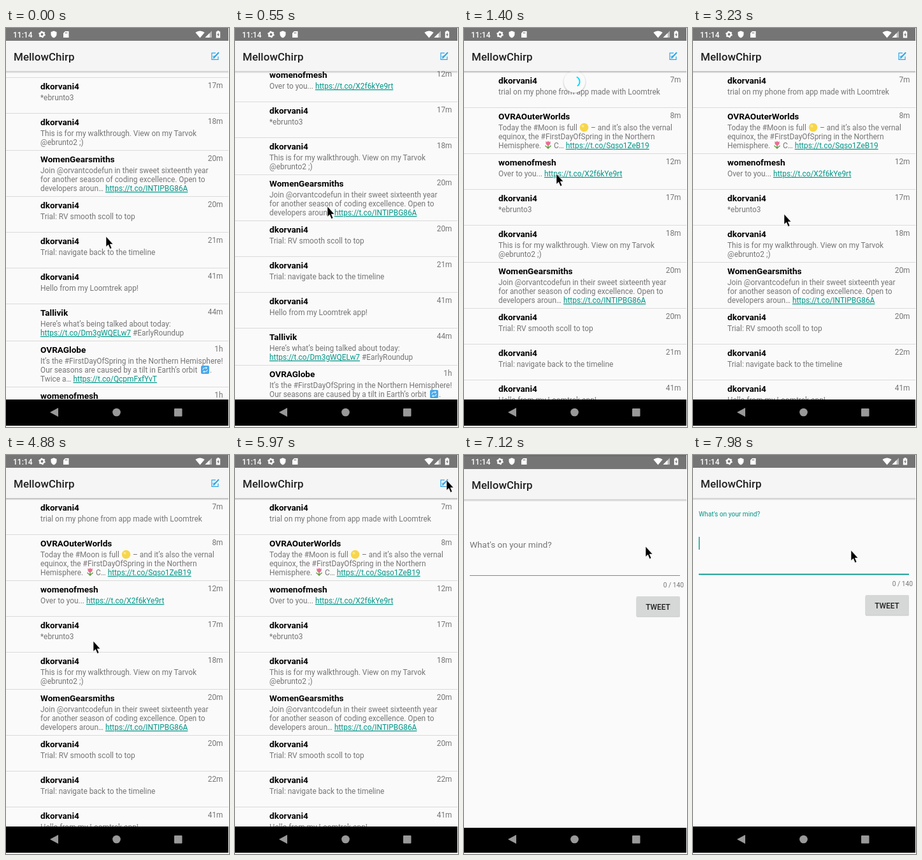
An HTML page for the animation above (8 s loop, 350 by 624 pixels).

```html
<!DOCTYPE html>
<html lang="en">
<head>
<meta charset="utf-8">
<title>Timeline</title>
<style>
  html, body { margin: 0; width: 100%; height: 100%; overflow: hidden; background: #fff; }
  svg { display: block; width: 350px; height: 624px; }
  text { font: 11.9px Roboto, sans-serif; fill: #757575; white-space: pre; }
  .name { font-size: 13.6px; font-weight: 700; fill: #000; }
  .title { font-size: 17px; font-weight: 500; fill: #212121; }
  .clock { font-size: 12px; font-weight: 500; fill: #fff; }
  .button { font-weight: 500; fill: #212121; text-anchor: middle; }
  .hint { font-size: 13.6px; fill: inherit; }
  .count { font-size: 10.2px; }
  .end { text-anchor: end; }
  .link { fill: #009688; text-decoration: underline; }
  .disc { filter: drop-shadow(0 1px 1.2px rgba(0,0,0,.28)); }
</style>
</head>
<body>
<svg viewBox="0 0 350 624">
  <defs>
    <clipPath id="listClip"><rect y="67" width="349" height="514"/></clipPath>
    <clipPath id="revealClip"><rect id="reveal" width="349" height="624"/></clipPath>
    <linearGradient id="shade" x2="0" y2="1">
      <stop stop-color="#000" stop-opacity=".26"/>
      <stop offset="1" stop-color="#000" stop-opacity="0"/>
    </linearGradient>
    <g id="bar">
      <rect width="349" height="20" fill="#757575"/>
      <rect y="67" width="349" height="4" fill="url(#shade)"/>
      <rect y="20" width="349" height="47.5" fill="#f5f5f5"/>
      <text class="title" x="12" y="50.5">MellowChirp</text>
    </g>
  </defs>

  <rect y="581" width="349" height="41" fill="#000"/>
  <g fill="#999">
    <path d="M69 601 82 594V608z"/>
    <circle cx="173.5" cy="601" r="6.3"/>
    <rect x="264" y="595" width="12.5" height="12.5" rx="1"/>
  </g>

  <g id="home">
    <rect width="349" height="581" fill="#fafafa"/>
    <g clip-path="url(#listClip)">
      <g id="list"></g>
      <g id="spinner">
        <circle class="disc" r="17" fill="#fafafa"/>
        <path id="arc" fill="none" stroke="#00ddff" stroke-width="2"/>
      </g>
    </g>
    <use href="#bar"/>
    <circle id="ripple" cx="328.5" cy="43.5" fill="#000"/>
    <g fill="none" stroke="#2aa5ea" stroke-width="1.2">
      <path d="M329 39.2H323V49.4H333V44.5"/>
      <path d="M325.5 47.3 334 38.3" stroke-width="2"/>
      <path d="M325.5 47.3 328 43.2M324.5 44.6 327 44" stroke-width="1"/>
    </g>
    <rect id="dim" width="349" height="581" opacity=".085"/>
  </g>

  <g clip-path="url(#revealClip)">
    <g id="compose">
      <rect width="349" height="581" fill="#fafafa"/>
      <use href="#bar"/>
      <g id="hint"><text class="hint">What's on your mind?</text></g>
      <rect id="caret" x="9" y="128" width="1.4" height="20" fill="#009688"/>
      <rect id="rule" x="9" width="330"/>
      <text class="end count" x="345" y="204.7">0 / 140</text>
      <rect x="270.5" y="220.5" width="68.5" height="31" rx="2" opacity=".2"/>
      <rect x="270.5" y="219" width="68.5" height="31.5" rx="2" fill="#d6d7d7"/>
      <text class="button" x="304.5" y="239.5">TWEET</text>
    </g>
  </g>

  <text class="clock" x="11" y="14.5">11:14</text>
  <g fill="#fff">
    <circle cx="56.5" cy="10" r="3.2" fill="none" stroke="#fff" stroke-width="2.4"/>
    <circle cx="56.5" cy="10" r="4.7" fill="none" stroke="#fff" stroke-width="1.3" stroke-dasharray="2.4 2.52"/>
    <path d="M75 4.5 79.5 6.2V9.5Q79.5 13.7 75 15.5 70.5 13.7 70.5 9.5V6.2z"/>
    <path fill-rule="evenodd" d="M93 5H98.5V15H90V8zM93 6.5V8.8H94V6.5zM95 6.5V8.8H96V6.5z"/>
    <path d="M297.3 7Q304.5 1.8 311.7 7L304.5 15.5z"/>
    <path d="M323 4.5V15H312.5z" opacity=".5"/>
    <path d="M319.5 8V15H312.5z"/>
    <path fill-rule="evenodd" d="M329.8 5.5H331.6V4.2H334.4V5.5H336.2V15.5H329.8zM333.6 7 331.2 11H332.6V14L334.9 9.9H333.6z"/>
  </g>
  <path id="mouse" d="M0 0V16.2L3.6 13 6.3 19.4 8.9 18.3 6.2 12.1H11z" stroke="#fff" stroke-width=".6"/>
</svg>

<script>
(() => {
  const LOOP = 8000, STEP = 140;
  const $ = id => document.getElementById(id);
  const set = (id, attrs) => { for (const k in attrs) $(id).setAttribute(k, attrs[k]); };
  const show = (id, on) => { $(id).style.display = on ? '' : 'none'; };
  const move = (id, x, y, scale = 1) => set(id, { transform: `translate(${x} ${y}) scale(${scale})` });
  const clamp = p => Math.min(1, Math.max(0, p));
  const ease = p => { p = clamp(p); return p * p * (3 - 2 * p); };

  // straight moves between key points [time, ...values]
  function tween(keys, t) {
    const i = keys.findIndex(k => k[0] > t);
    if (i < 0) return keys[keys.length - 1].slice(1);
    const a = keys[i - 1], b = keys[i], p = (t - a[0]) / (b[0] - a[0]);
    return a.slice(1).map((v, n) => Math.round(v + (b[n + 1] - v) * p));
  }

  // {n} in a line jumps to x = n, leaving room for an icon
  const posts = [
    ['dkorvani4', '7m', 'trial on my phone from app made with Loomtrek'],
    ['OVRAOuterWorlds', '8m', 'Today the #Moon is full{199}– and it’s also the vernal',
      'equinox, the #FirstDayOfSpring in the Northern', 'Hemisphere.{141}C… https://t.co/Sqso1ZeB19'],
    ['womenofmesh', '12m', 'Over to you... https://t.co/X2f6kYe9rt'],
    ['dkorvani4', '17m', '*ebrunto3'],
    ['dkorvani4', '18m', 'This is for my walkthrough. View on my Tarvok', '@ebrunto2 ;)'],
    ['WomenGearsmiths', '20m', 'Join @orvantcodefun in their sweet sixteenth year',
      'for another season of coding excellence. Open to', 'developers aroun… https://t.co/INTIPBG86A'],
    ['dkorvani4', '20m', 'Trial: RV smooth scoll to top'],
    ['dkorvani4', '21m', 'Trial: navigate back to the timeline'],
    ['dkorvani4', '41m', 'Hello from my Loomtrek app!'],
    ['Tallivik', '44m', 'Here’s what’s being talked about today:', 'https://t.co/Dm3gWQELw7 #EarlyRoundup'],
    ['OVRAGlobe', '1h', 'It’s the #FirstDayOfSpring in the Northern Hemisphere!',
      'Our seasons are caused by a tilt in Earth’s orbit{320}.', 'Twice a… https://t.co/QcpmFxfYvT'],
    ['womenofmesh', '1h', '']
  ];
  const icons = {
    1: `<circle cx="188.5" cy="31.5" r="6.8" fill="#f7d64a"/><circle cx="186.5" cy="29.5" r="2" fill="#fbe98c"/>
        <path d="M132 58V65M132 64 127.5 60M132 64 136.5 60" stroke="#5d9c3f" stroke-width="1.5"/>
        <path d="M128.5 53 130.3 54.5 132 52.5 133.7 54.5 135.5 53Q136.5 59 132 59.5 127.5 59 128.5 53z" fill="#ec6d92"/>`,
    10: `<rect x="306" y="39" width="13" height="13" rx="2" fill="#4aa8e8"/>
        <path d="M309 45.5Q309 42.5 312.5 42.5H315M316 45.5Q316 48.5 312.5 48.5H310M313.5 41 315.3 42.5 313.5 44M311.5 47 309.7 48.5 311.5 50" fill="none" stroke="#fff"/>`
  };

  function line(str, y) {
    let x = 54, out = '';
    for (const part of str.split(/(https\S+|\{\d+\})/)) {
      if (!part) continue;
      if (part[0] === '{') { x = parseInt(part.slice(1)); continue; }
      out += `<tspan${x ? ` x="${x}"` : ''}${part.startsWith('https') ? ' class="link"' : ''}>${part}</tspan>`;
      x = 0;
    }
    return `<text y="${y}">${out}</text>`;
  }

  let rowY = 68;
  $('list').innerHTML = posts.map(([name, age, ...body], i) => {
    const row = `<g transform="translate(0 ${rowY})"><rect width="349" height="1" fill="#dadada"/>
      <text class="name" x="54" y="19">${name}</text>
      <text class="end" x="340.5" y="17" id="age${i}">${age}</text>
      ${body.map((s, n) => line(s, 36 + 14 * n)).join('')}${icons[i] || ''}</g>`;
    rowY += Math.max(56, 30 + 14 * body.length);
    return row;
  }).join('');

  const pointer = [
    [0, 157, 326], [280, 146, 248], [560, 145, 279], [700, 145, 306], [1260, 149, 155],
    [1400, 145, 228], [1820, 142, 267], [2520, 142, 288], [3220, 143, 291], [4760, 143, 291],
    [4900, 137, 291], [5180, 137, 291], [5600, 243, 55], [5740, 323, 29], [5880, 332, 39],
    [6580, 332, 41], [6860, 325, 74], [7280, 265, 177], [7560, 248, 149]
  ];
  const scrolling = [[0, -175], [420, -154], [560, -137], [1120, -2], [1400, 0]];

  function drawSpinner(t) {
    const on = t >= 1400 && t < 3050;
    show('spinner', on);
    if (!on) return;
    const pulled = clamp((t - 1400) / 280);
    move('spinner', 173.5, 84 + 22 * pulled, t < 2940 ? 1 : .45);
    let from = -1.15 + .4 * pulled, to = 1 + 2.6 * pulled;
    if (t > 1900) {
      const p = (t - 1900) / 1332, turn = p * 3.2 - .75;
      from = turn + ease(p * 2 - 1) * 5;
      to = turn + .3 + ease(p * 2) * 5;
    }
    const at = a => `${8 * Math.cos(a)} ${8 * Math.sin(a)}`;
    set('arc', { d: `M${at(from)}A8 8 0 ${to - from > Math.PI ? 1 : 0} 1 ${at(to)}` });
  }

  // the new page rises and is uncovered from below while the old one dims and lifts
  function drawOpening(t) {
    const since = t - 6860, on = since >= 0;
    show('compose', on);
    show('dim', on);
    const rise = Math.round(22 * Math.exp(-since / 108));
    const clip = Math.round(241 * Math.exp(-since / 45));
    if (on) set('reveal', { y: clip });
    move('compose', 0, on ? rise : 0);
    move('home', 0, on ? (rise - 22) / 2 - 2 : 0);
  }

  function drawField(t) {
    const f = ease((t - 7660) / 320);
    move('hint', 9, 143 - 47.2 * f, 1 - .25 * f);
    set('hint', { fill: `rgb(${117 - 117 * f},${117 + 33 * f},${117 + 19 * f})` });
    show('caret', t >= 7840);
    set('rule', f ? { y: 185.7, height: 1.8, fill: '#009688' } : { y: 186, height: 1, fill: '#868686' });
  }

  function draw(t) {
    move('mouse', ...tween(pointer, t));
    move('list', 0, tween(scrolling, t)[0]);
    $('age7').textContent = t < 2940 ? '21m' : '22m';
    const press = ease((t - 6160) / 420);
    show('ripple', t >= 6300 && t < 6860);
    set('ripple', { r: 14 + 3 * press, opacity: .1 * press });
    drawSpinner(t);
    drawOpening(t);
    drawField(t);
  }

  // the screen refreshes about seven times a second
  function tick() {
    const t = performance.now() % LOOP;
    draw(Math.floor((t + 30) / STEP) * STEP);
    requestAnimationFrame(tick);
  }
  tick();
})();
</script>
</body>
</html>
```
